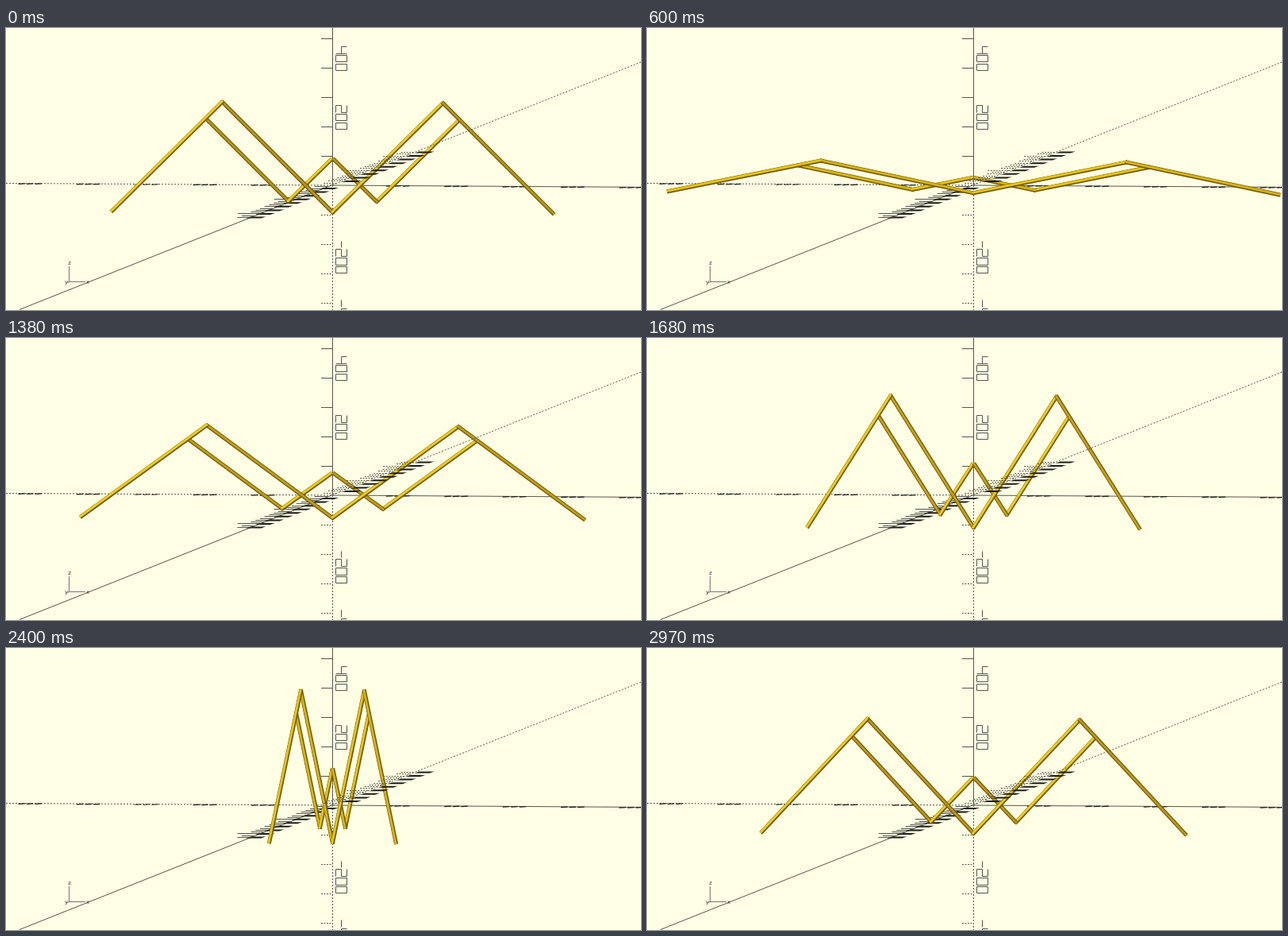
These frames come from a looping animation (800 by 355 pixels, 3000 ms). An HTML page with a canvas:

```html
<!DOCTYPE html>
<html lang="en">
<head>
<meta charset="utf-8">
<title>Scissor linkage</title>
<style>
html, body { margin: 0; width: 100%; height: 100%; overflow: hidden; background: #ffffe5; }
canvas { display: block; }
</style>
</head>
<body>
<canvas id="stage" width="800" height="355"></canvas>
<script>
const ctx = document.getElementById('stage').getContext('2d');
const OX = 411.5, OY = 198, TICK = 37, ARM = 196.6;
const TILT = 0.0055, DEPTH = 0.398;
const LOOP = 3000, STEP = 30;
const INK = '#55554c', DARK = '#1c1c18';

// Digit strokes in a unit cell: across 0..1, height 0..2
const GLYPHS = {
  '0': [[0, 0, 1, 0, 1, 2, 0, 2, 0, 0]],
  '2': [[0, 2, 1, 2, 1, 1, 0, 1, 0, 0, 1, 0]],
  '4': [[0, 2, 0, 1, 1, 1], [1, 2, 1, 0]],
  '-': [[0, 1, 1, 1]]
};

const snap = v => Math.floor(v) + 0.5;

function line(points, color, width = 1, dash = []) {
  ctx.beginPath();
  for (let i = 0; i < points.length; i += 2) ctx.lineTo(points[i], points[i + 1]);
  ctx.strokeStyle = color;
  ctx.lineWidth = width;
  ctx.setLineDash(dash);
  ctx.stroke();
}

// Label reading downwards beside the vertical axis
function label(text, top) {
  [...text].forEach((ch, n) => {
    for (const stroke of GLYPHS[ch]) {
      const pts = [];
      for (let i = 0; i < stroke.length; i += 2) {
        pts.push(snap(415 + stroke[i + 1] * 7.25), snap(top + n * 10.8 + stroke[i] * 8.5));
      }
      line(pts, INK);
    }
  });
}

function verticalAxis() {
  line([OX, 0, OX, OY], INK);
  line([OX, OY, OX, 355], INK, 1, [2, 2]);
  for (let n = -4; n <= 5; n++) {
    if (!n) continue;
    const y = OY - n * TICK + 0.5;
    line([397, y, OX, y], INK, 1, n < 0 ? [2, 1.5] : []);
  }
  label('400', 23.5);
  label('200', 97.5);
  label('-200', 268);
  label('-400', 342.5);
}

function horizontalAxis() {
  const at = x => OY + (x - OX) * 0.0062;
  line([0, at(0), OX, at(OX)], INK, 1, [2, 2]);
  line([OX, at(OX), 800, at(800)], INK);
  for (let n = -5; n <= 5; n++) {
    if (!n) continue;
    const x = OX + n * 73.4 - (n < 0 ? 29 : 6), y = at(x) + 0.4;
    for (let d = 0; d < 3; d++) {
      line([x + d * 10.5, y + 0.4, x + d * 10.5 + 8.5, y - 0.1], DARK, 1.2);
    }
  }
}

// Axis running through the view; side 1 is the far half, -1 the near half
function depthAxis(side) {
  const far = side > 0, y0 = OY - 0.5;
  const endX = far ? 17 : 800;
  line([OX, y0, endX, y0 - (endX - OX) * DEPTH], INK, 1, far ? [] : [2, 2]);
  for (let n = 1; n <= 18; n++) {
    const y = y0 + side * n * 2.28;
    const x = OX - (y - y0) / DEPTH;
    const reach = n % 8 ? 17 : 28;
    line([x - reach, snap(y), x, snap(y)], INK, 1, far ? [] : [2, 1.5]);
    if (n % 2) continue;
    const left = x - 3 - side * 3;
    ctx.fillStyle = DARK;
    ctx.beginPath();
    ctx.moveTo(left, y + 1);
    ctx.lineTo(left + 19, y + 1);
    ctx.lineTo(left + 25, y - 1);
    ctx.lineTo(left + 6, y - 1);
    ctx.fill();
  }
}

function gizmo() {
  line([79.5, 300, 79.5, 319.5, 100, 319.5], '#77776c');
  line([77, 320.5, 80, 319.5], '#77776c');
  ctx.fillStyle = '#333';
  ctx.font = '7px "DejaVu Sans", sans-serif';
  ctx.textAlign = 'center';
  ctx.fillText('z', 80, 298);
  ctx.fillText('x', 103, 322);
  ctx.fillText('y', 76, 322);
}

const mix = (a, b, k) =>
  `rgb(${a.map((v, i) => Math.round(v + (b[i] - v) * k)).join()})`;

// Rod from a to b, given left to right, lit from the upper left
function rod(a, b) {
  const dx = b[0] - a[0], dy = b[1] - a[1], len = Math.hypot(dx, dy);
  const ux = dx / len, uy = dy / len;
  const lit = (ux - uy) * Math.SQRT1_2;
  const k = Math.abs(lit);
  const strips = [
    [0, 5, mix([104, 82, 8], [108, 87, 4], k)],
    [-0.8, 3.3, mix([150, 120, 16], [196, 162, 8], k)],
    [-0.8, 2.2, mix([186, 150, 22], [242, 209, 16], k)]
  ];
  for (const [shift, width, color] of strips) {
    const ox = -uy * shift * lit, oy = ux * shift * lit;
    line([a[0] - ux * 1.5 + ox, a[1] - uy * 1.5 + oy,
          b[0] + ux * 1.5 + ox, b[1] + uy * 1.5 + oy], color, width);
  }
}

function linkage(angle) {
  const c = Math.cos(angle) * ARM, s = Math.sin(angle) * ARM;
  const joint = (x, y) => [OX + x * c, OY + y * s + x * c * TILT];
  const rods = [
    [-1.15, -0.6, -0.4, 0.147],
    [-0.4, 0.147, -0.01, -0.235],
    [-1, -0.75, 0, 0.245],
    [-2, 0.245, -1, -0.75]
  ];
  for (const [x1, y1, x2, y2] of rods) {
    rod(joint(x1, y1), joint(x2, y2));
    rod(joint(-x2, y2), joint(-x1, y1));
  }
}

function draw(ms) {
  const phase = Math.floor((ms % LOOP) / STEP) * STEP / LOOP;
  const degrees = 45 - 35 * Math.sin(2 * Math.PI * phase);
  ctx.fillStyle = '#ffffe5';
  ctx.fillRect(0, 0, 800, 355);
  horizontalAxis();
  verticalAxis();
  depthAxis(1);
  linkage(degrees * Math.PI / 180);
  depthAxis(-1);
  gizmo();
}

let start;
function frame(now) {
  if (start === undefined) start = now;
  draw(Math.max(0, now - start));
  requestAnimationFrame(frame);
}
draw(0);
requestAnimationFrame(frame);
</script>
</body>
</html>
```
